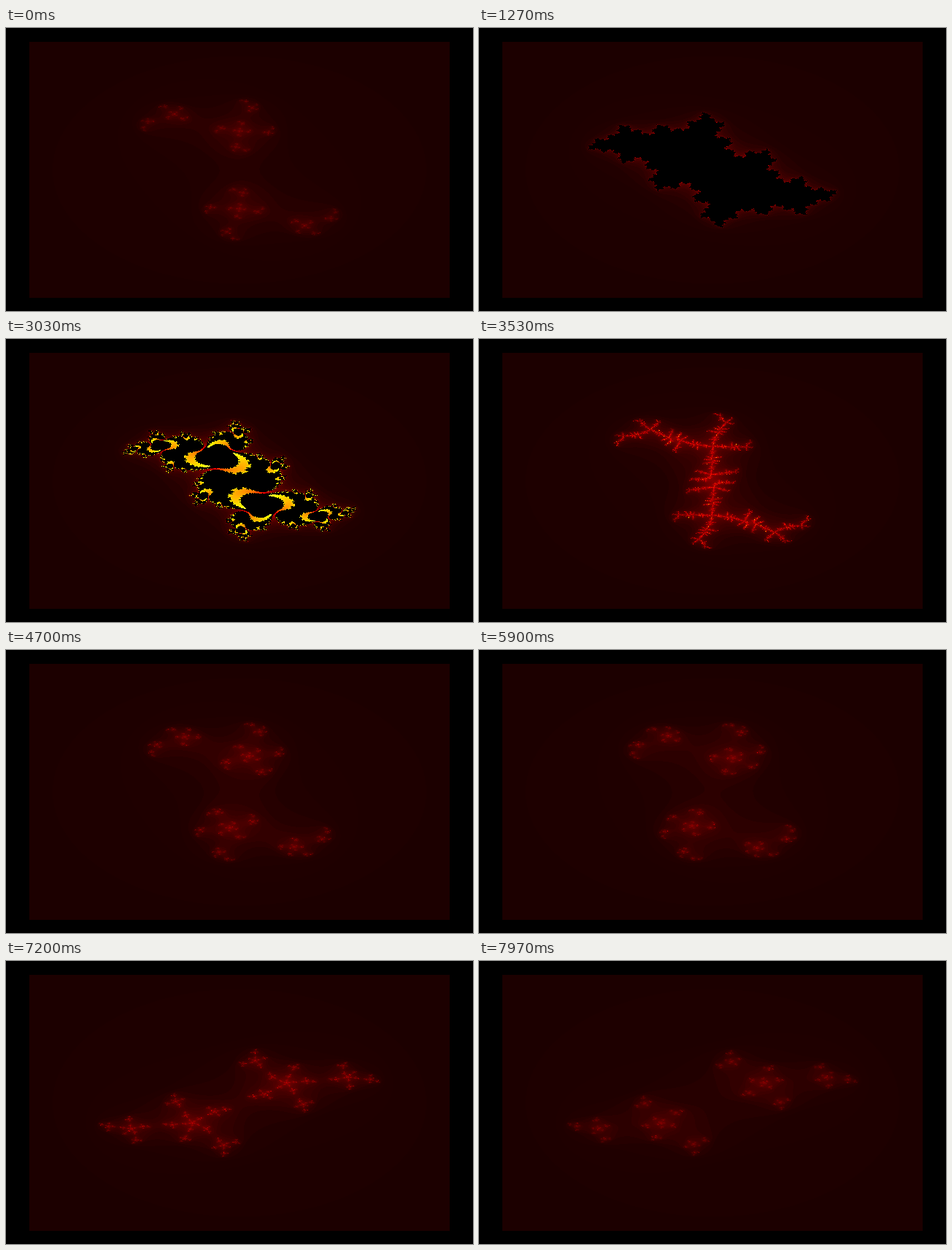
These frames come from a looping animation (640x388 px, 8 s). An HTML page with a canvas:

```html
<!DOCTYPE html>
<html lang="en">
<head>
<meta charset="utf-8">
<title>Julia set</title>
<style>
  html, body { margin: 0; width: 100%; height: 100%; overflow: hidden; background: #000; }
  canvas { display: block; width: 640px; height: 388px; }
</style>
</head>
<body>
<canvas id="stage" width="640" height="388"></canvas>
<script>
const LOOP = 8000;
const LEFT = 32, TOP = 19, W = 576, H = 351;
const SPAN = 4.5;       // both axes cover -2.25 to 2.25
const MAX_ITER = 100;

// Key poses of the constant c = re + i im, t in seconds
const KEYS = [
  { t: 0, re: 0.47, im: 0.686 },
  { t: 1.27, re: -0.31, im: 0.58 },
  { t: 2.3, re: -0.88, im: 0.7 },
  { t: 3.53, re: 0.374, im: 0.6 },
  { t: 5.9, re: 0.53, im: 0.336 },
  { t: 6.67, re: -0.49, im: -0.65 },
  { t: 8, re: -0.73, im: -0.741 }
];

const ctx = document.getElementById('stage').getContext('2d');
const image = ctx.createImageData(W, H);
const pixels = new Uint32Array(image.data.buffer);

const channel = v => Math.round(Math.max(0, Math.min(255, v)));

// Dark red through red and yellow to white; points that never escape are black
function colour(n) {
  if (n === MAX_ITER) return 0xff000000;
  const heat = 28 + 1.5 * Math.min(n, 3) + 5.7 * Math.max(0, n - 3);
  return (0xff000000 | channel(heat - 510) << 16 | channel(heat - 255) << 8 | channel(heat)) >>> 0;
}
const palette = Uint32Array.from({ length: MAX_ITER + 1 }, (_, n) => colour(n));

// Flat at ends and turning points, otherwise the harmonic mean of both sides
function slope(i, part) {
  if (i === 0 || i === KEYS.length - 1) return 0;
  const rate = j => (KEYS[j + 1][part] - KEYS[j][part]) / (KEYS[j + 1].t - KEYS[j].t);
  const before = rate(i - 1), after = rate(i);
  return before * after > 0 ? 2 * before * after / (before + after) : 0;
}

// Monotone cubic through the key poses
function valueAt(t, part) {
  const i = KEYS.findLastIndex(key => key.t <= t);
  const a = KEYS[i], b = KEYS[i + 1];
  const d = b.t - a.t, u = (t - a.t) / d, v = 1 - u;
  return v * v * ((1 + 2 * u) * a[part] + u * d * slope(i, part)) +
         u * u * ((1 + 2 * v) * b[part] - v * d * slope(i + 1, part));
}

function escapeTime(x, y, cx, cy) {
  let n = 0, xx = x * x, yy = y * y;
  while (n < MAX_ITER && xx + yy <= 4) {
    y = 2 * x * y + cy;
    x = xx - yy + cx;
    xx = x * x;
    yy = y * y;
    n++;
  }
  return n;
}

function draw(t) {
  const cx = valueAt(t, 're'), cy = valueAt(t, 'im');
  const last = W * H - 1;
  // The set is symmetric about the centre, so half the rows are enough
  for (let row = 0, i = 0; row < H / 2; row++) {
    const y = (0.5 - (row + 0.5) / H) * SPAN;
    for (let col = 0; col < W; col++, i++) {
      const x = ((col + 0.5) / W - 0.5) * SPAN;
      pixels[i] = pixels[last - i] = palette[escapeTime(x, y, cx, cy)];
    }
  }
  ctx.putImageData(image, LEFT, TOP);
}

function frame() {
  draw(performance.now() % LOOP / 1000);
  requestAnimationFrame(frame);
}
frame();
</script>
</body>
</html>
```
